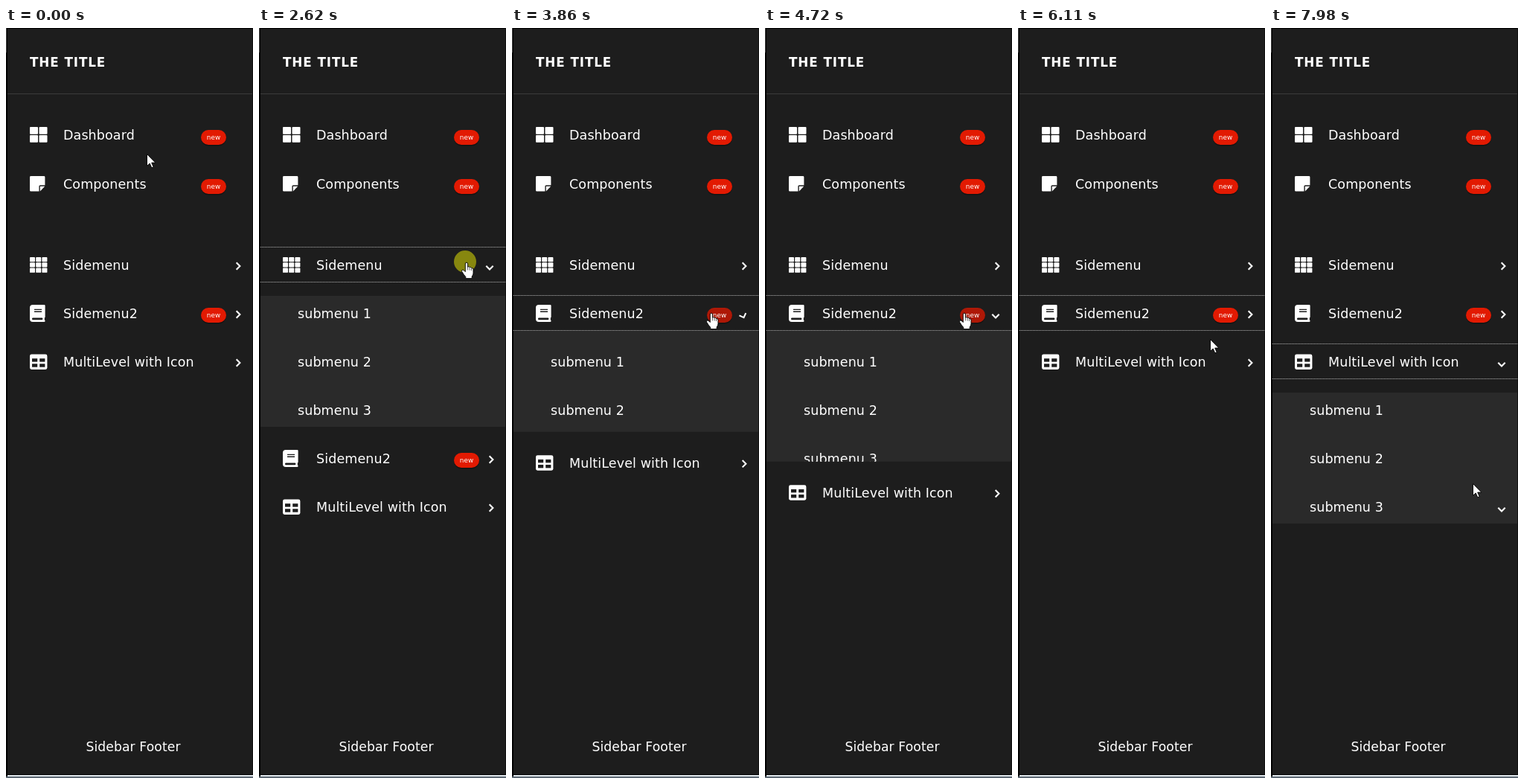
An HTML page for the animation above (8000 ms loop, 332x1008 px).

```html
<!DOCTYPE html>
<html lang="en">
<head>
<meta charset="utf-8">
<title>Sidebar menu</title>
<style>
html, body { margin: 0; width: 100%; height: 100%; overflow: hidden; background: #1d1d1d; }
#stage { display: block; width: 332px; height: 1008px; }
text { font: 400 17.5px "DejaVu Sans", Inter, sans-serif; letter-spacing: .1px; fill: #fff; }
.title { font-size: 16.8px; font-weight: 700; letter-spacing: .9px; }
.footer { font-size: 17.2px; text-anchor: middle; }
.badge text { font-size: 8.9px; letter-spacing: 0; text-anchor: middle; }
.chevron { fill: none; stroke: #fff; stroke-width: 2.1; }
.focus { fill: none; stroke: #b4b4b4; stroke-dasharray: 1 1; shape-rendering: crispEdges; }
</style>
</head>
<body>
<svg id="stage" viewBox="0 0 332 1008" xmlns="http://www.w3.org/2000/svg"></svg>
<script>
const LOOP = 8000, SLIDE = 300, ROW = 65, PANEL = 176;
const stage = document.getElementById('stage');

function add(parent, tag, attrs = {}, content) {
  const el = document.createElementNS('http://www.w3.org/2000/svg', tag);
  for (const k in attrs) el.setAttribute(k, attrs[k]);
  if (content) el.textContent = content;
  parent.appendChild(el);
  return el;
}
const rect = (parent, x, y, width, height, fill, rx = 0) =>
  add(parent, 'rect', { x, y, width, height, fill, rx });
const label = (parent, x, mid, content, cls = '') =>
  add(parent, 'text', { x, y: mid + 6, class: cls }, content);
const move = (el, x, y) => el.setAttribute('transform', `translate(${x} ${y})`);
const show = (el, on) => el.setAttribute('visibility', on ? 'visible' : 'hidden');

// Icons, drawn around the vertical middle of a row
const icons = {
  tiles(g) {
    for (const x of [32, 44.5])
      for (const y of [-11, 0]) rect(g, x, y, 11, 9.8, '#fff', 1);
  },
  note(g) {
    add(g, 'path', { fill: '#fff', d: 'M33.5-11H51q1.4 0 1.4 1.4V1.2H46q-1.6 0-1.6 1.6V9.6H33.5Q32 9.6 32 8.2V-9.6Q32-11 33.5-11ZM45.8 2.8H52.2L45.8 9.4Z' });
  },
  grid(g) {
    for (let i = 0; i < 9; i++)
      rect(g, 32 + i % 3 * 8.2, -11 + Math.floor(i / 3) * 7.3, 7, 6.2, '#fff', .9);
  },
  book(g) {
    add(g, 'path', { fill: '#fff', d: 'M36-12H51.3Q52.6-12 52.6-10.7V4.2Q52.6 5 51.8 5.6V8.6Q52.6 8.8 52.6 9.8T51.5 11H36Q32 11 32 7V-8Q32-12 36-12Z' });
    add(g, 'path', { stroke: '#1d1d1d', 'stroke-width': 1.4, d: 'M38-5.6H48M38-2.7H48' });
    rect(g, 35, 5.4, 14.4, 2.8, '#1d1d1d', 1.3);
  },
  table(g) {
    rect(g, 32, -10.5, 23.4, 20.5, '#fff', 2.4);
    for (const x of [35, 45.2])
      for (const y of [-4.8, 2.3]) rect(g, x, y, 7.2, 4.4, '#1d1d1d');
  }
};

function addChevron(parent, mid) {
  const g = add(parent, 'g', { transform: `translate(310 ${mid + 1})` });
  return add(g, 'path', { class: 'chevron', d: 'M-.3-4.7L4.4 0L-.3 4.7' });
}

// Returns the pill, whose colour fades under the pointer
function addBadge(parent, mid) {
  const g = add(parent, 'g', { class: 'badge' });
  rect(g, 262, mid - 8.6, 34, 20, '#131313', 10);
  const pill = rect(g, 262, mid - 10, 34, 20, '#e21a02', 10);
  add(g, 'text', { x: 279, y: mid + 3 }, 'new');
  return pill;
}

// Frame around the menu
rect(stage, 0, 0, 332, 1008, '#1d1d1d');
rect(stage, 2, 88, 329, 1, '#3c3c3c');
label(stage, 32, 46, 'THE TITLE', 'title');
label(stage, 171, 966, 'Sidebar Footer', 'footer');

// slides: [start, opening?]; focus: [from, to]
const items = [
  { name: 'Dashboard', icon: 'tiles', y: 144, badge: 3 },
  { name: 'Components', icon: 'note', y: 210, badge: 3 },
  { name: 'Sidemenu', icon: 'grid', y: 319, slides: [[1540, true], [2780, false]], focus: [1540, 3700] },
  { name: 'Sidemenu2', icon: 'book', y: 384, badge: 2, slides: [[3720, true], [4720, false]], focus: [3700, 6250] },
  { name: 'MultiLevel with Icon', icon: 'table', y: 449, slides: [[6390, true]], focus: [6250, LOOP], nested: true }
];

for (const it of items) {
  it.g = add(stage, 'g');
  icons[it.icon](it.g);
  label(it.g, 77, 0, it.name);
  if (it.badge) it.pill = addBadge(it.g, it.badge);
  if (!it.slides) continue;
  it.chevron = addChevron(it.g, 0);
  it.outline = add(it.g, 'path', { class: 'focus', d: 'M2-24.5H331M2 22.5H331' });
  it.panel = add(it.g, 'svg', { x: 2, width: 329, height: 0, overflow: 'hidden' });
  rect(it.panel, 0, 0, 329, PANEL + 40, '#2a2a2a');
  it.subs = add(it.panel, 'g');
  for (let i = 1; i <= 3; i++) label(it.subs, 52, i * ROW, 'submenu ' + i);
  if (it.nested) addChevron(it.subs, 3 * ROW).setAttribute('transform', 'rotate(90)');
}

// Window edges
rect(stage, 0, 0, 2, 1008, '#000');
rect(stage, 0, 0, 332, 1, '#000');
rect(stage, 0, 0, 1, 33, '#444');
rect(stage, 331, 0, 1, 1008, '#101010');
rect(stage, 0, 1003, 332, 1, '#000');
rect(stage, 2, 1004, 330, 2, '#dfe5ea');
rect(stage, 0, 1006, 332, 2, '#5c6873');

// Pointer
const ring = add(stage, 'circle', { r: 15, fill: '#ff0', opacity: .47 });
const arrow = add(stage, 'path', {
  fill: '#fff', stroke: '#000', 'stroke-width': .9,
  d: 'M.5.5V16.4L4.2 13L6.8 18.8L9.2 17.8L6.7 12.1H11.8Z'
});
const hand = add(stage, 'g');
add(hand, 'path', {
  fill: '#fff', stroke: '#000', 'stroke-width': .9, 'stroke-linejoin': 'round',
  d: 'M.3 3Q.3 1.2 1.9 1.2T3.6 3V7.2Q5.4 5.8 6.2 7.6Q7.8 6.6 8.6 8.6Q10.8 8 11 10.6V15.5Q11 17.6 9.2 20V22.6H.8V20.4Q-1.6 18-4.4 13.2Q-5 11.2-3.2 11Q-1.6 11.2.3 13.6Z'
});
add(hand, 'path', { fill: 'none', stroke: '#222', 'stroke-width': .7, d: 'M3.6 7V11.4M6.2 7.6V11.6M8.6 8.6V12' });

const path = [
  [0, 189, 169], [60, 189, 169], [450, 263, 205], [850, 277, 296], [990, 277, 314],
  [3070, 277, 314], [3540, 266, 382], [5600, 266, 382], [6230, 256, 426], [6430, 256, 426],
  [6890, 248, 462], [7190, 220, 536], [7300, 220, 536], [7350, 222, 539], [7450, 222, 539],
  [7600, 206, 522], [7960, 271, 612], [LOOP, 271, 612]
];
const presses = [[1380, 1470], [2620, 2790], [3630, 3710], [4490, 4720], [6250, 6420]];

function pointerAt(t) {
  const i = path.findIndex(p => p[0] > t);
  const [t0, x0, y0] = path[i - 1], [t1, x1, y1] = path[i];
  const k = (t - t0) / (t1 - t0);
  return [x0 + (x1 - x0) * k, y0 + (y1 - y0) * k];
}

// cubic-bezier(.25, .1, .25, 1)
function ease(x) {
  if (x <= 0) return 0;
  if (x >= 1) return 1;
  const curve = (a, b, s) => 3 * a * s * (1 - s) ** 2 + 3 * b * s * s * (1 - s) + s ** 3;
  let lo = 0, hi = 1;
  for (let i = 0; i < 24; i++) {
    const mid = (lo + hi) / 2;
    if (curve(.25, .25, mid) < x) lo = mid; else hi = mid;
  }
  return curve(.1, 1, lo);
}

function openness(slides, t) {
  const last = slides.filter(s => s[0] <= t).pop();
  if (!last) return 0;
  const k = ease((t - last[0]) / SLIDE);
  return last[1] ? k : 1 - k;
}

const within = (t, [from, to]) => t >= from && t < to;

function render(t) {
  const [px, py] = pointerAt(t);
  const onRow = mid => py >= mid - 25 && py < mid + 23;
  let shift = 0, overRow = false;

  for (const it of items) {
    const y = it.y + shift;
    move(it.g, 0, y);
    overRow = overRow || onRow(y);
    if (it.pill) {
      const over = px >= 262 && px < 296 && Math.abs(py - y - it.badge) < 10;
      it.pill.setAttribute('opacity', over ? .75 : 1);
    }
    if (!it.slides) continue;

    const p = openness(it.slides, t), full = p === 1;
    const top = full ? 41 : 23;  // inner margins collapse once the slide is over
    it.panel.setAttribute('y', top);
    it.panel.setAttribute('height', PANEL * p);
    show(it.panel, p > 0);
    move(it.subs, -2, -top);
    it.chevron.setAttribute('transform', `rotate(${90 * p})`);
    show(it.outline, within(t, it.focus));
    if (full) overRow = overRow || [1, 2, 3].some(i => onRow(y + i * ROW));
    shift += full ? 3 * ROW : PANEL * p;
  }

  for (const el of [ring, arrow, hand]) move(el, Math.round(px), Math.round(py));
  show(hand, overRow);
  show(arrow, !overRow);
  show(ring, presses.some(span => within(t, span)));
}

function tick() {
  render(performance.now() % LOOP);
  requestAnimationFrame(tick);
}
tick();
</script>
</body>
</html>
```
